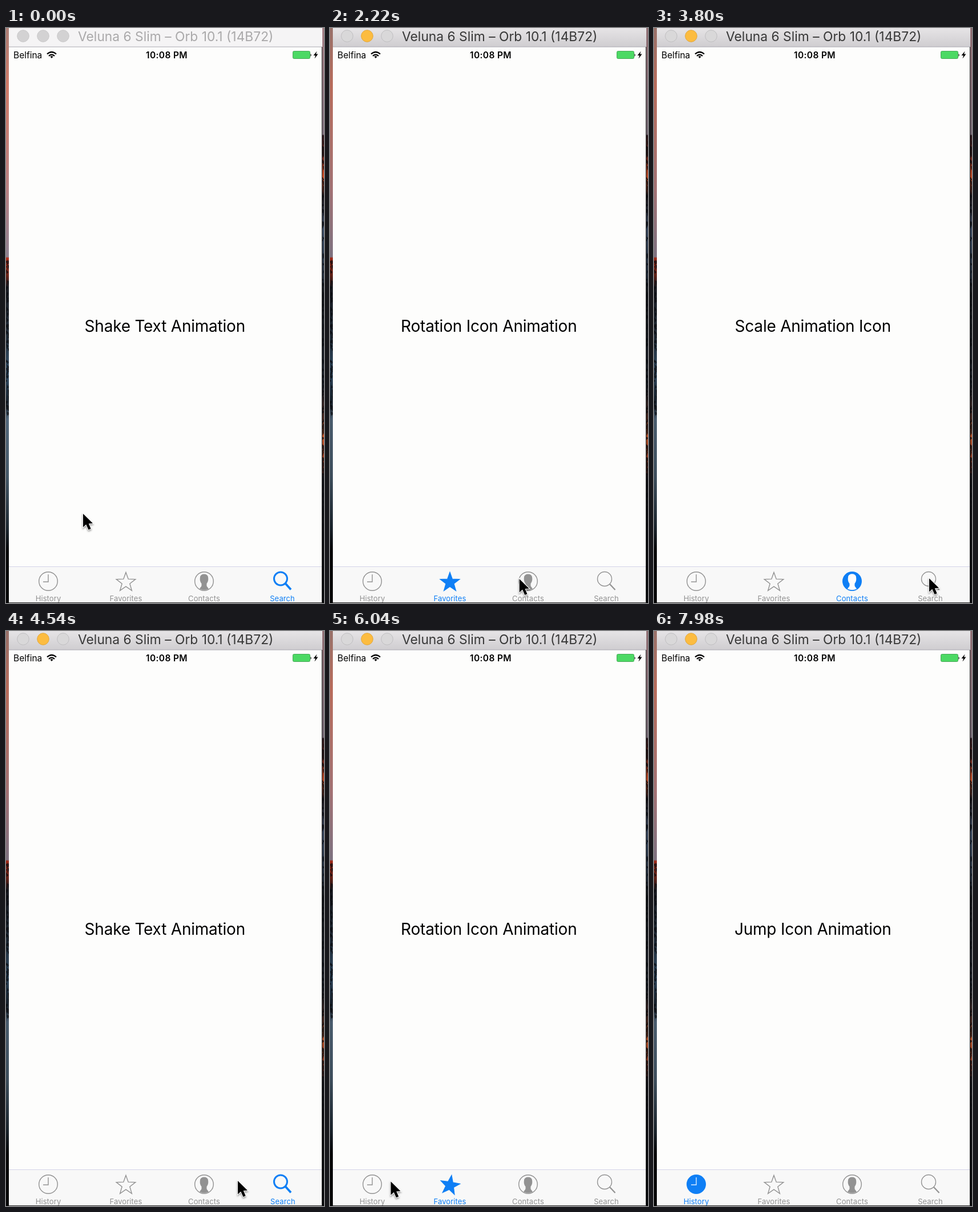
An HTML page for the animation above (8 s loop, 557 by 1005 pixels).

```html
<!DOCTYPE html>
<html lang="en">
<head>
<meta charset="utf-8">
<title>Tab bar animations</title>
<style>
  html, body { margin: 0; width: 100%; height: 100%; overflow: hidden; background: #000; }
  svg { display: block; width: 100vw; height: 100vh; font-family: Inter, Roboto, sans-serif; }
  .tab { color: #929292; }
  .tab text { font-size: 13px; letter-spacing: .1px; text-anchor: middle; fill: currentColor; }
  .line { fill: none; stroke: currentColor; stroke-width: 1.4; }
  .solid { fill: currentColor; }
  .white { fill: #fdfdfd; }
  .on, .selected .off { display: none; }
  .selected { color: #0f7ff5; }
  .selected .on { display: inline; }
</style>
</head>
<body>
<svg viewBox="0 0 557 1005">
  <defs>
    <linearGradient id="leftSky" x2="0" y2="1">
      <stop offset="0" stop-color="#ad8078"/><stop offset=".1" stop-color="#d17b68"/>
      <stop offset=".28" stop-color="#b98284"/><stop offset=".398" stop-color="#8f8292"/>
      <stop offset=".4" stop-color="#b5301c"/><stop offset=".43" stop-color="#6d2519"/>
      <stop offset=".45" stop-color="#191a21"/><stop offset=".54" stop-color="#263442"/>
      <stop offset=".6" stop-color="#34506a"/><stop offset=".65" stop-color="#18222d"/>
      <stop offset=".68" stop-color="#53687c"/><stop offset=".78" stop-color="#455868"/>
      <stop offset=".87" stop-color="#1d2730"/><stop offset=".91" stop-color="#050506"/>
    </linearGradient>
    <linearGradient id="rightSky" x2="0" y2="1">
      <stop offset="0" stop-color="#a67f85"/><stop offset=".185" stop-color="#81747f"/>
      <stop offset=".187" stop-color="#2c1b20"/><stop offset=".23" stop-color="#813021"/>
      <stop offset=".26" stop-color="#d4552b"/><stop offset=".29" stop-color="#1b1519"/>
      <stop offset=".35" stop-color="#40516a"/><stop offset=".43" stop-color="#263140"/>
      <stop offset=".46" stop-color="#15171b"/><stop offset=".62" stop-color="#1d222b"/>
      <stop offset=".68" stop-color="#4b2920"/><stop offset=".7" stop-color="#d26130"/>
      <stop offset=".76" stop-color="#8c3722"/><stop offset=".78" stop-color="#141318"/>
      <stop offset="1" stop-color="#07080a"/>
    </linearGradient>
    <linearGradient id="chrome" x2="0" y2="1">
      <stop offset="0" stop-color="#e6e4e6"/><stop offset="1" stop-color="#cfcdd0"/>
    </linearGradient>
    <clipPath id="screen"><rect x="5" y="33" width="548" height="971"/></clipPath>
    <path id="bust" d="M340 960C340 952.500 354 952.500 354 960C355 966 353 969 351.500 971V975
      C352 977 354 978 355 980.500Q347 984 339 980.500C340 978 342 977 342.500 975V971C341 969 339 966 340 960Z"/>
  </defs>

  <rect width="8" height="1005" fill="url(#leftSky)"/>
  <rect x="549" width="8" height="1005" fill="url(#rightSky)"/>
  <path id="rocks" fill="#0b0c10" opacity=".75"/>
  <rect id="shade" width="557" height="1005" opacity=".12"/>
  <rect x="5" width="549" height="1005" fill="#222"/>
  <rect x="5" y="33" width="548" height="971" fill="#fdfdfc"/>

  <rect id="bar" x="5" width="549" height="33"/>
  <path d="M5 33H553" stroke="#aaa9b2"/>
  <g id="lights" stroke-width="1">
    <circle cx="30" cy="14" r="10.300"/><circle cx="65" cy="14" r="10.300"/><circle cx="100" cy="14" r="10.300"/>
  </g>
  <text id="title" x="126" y="23" font-size="22.800">Veluna 6 Slim – Orb 10.1 (14B72)</text>

  <text x="13" y="53" font-size="15.500">Belfina</text>
  <g fill="none" stroke="#000" stroke-width="2.200">
    <path d="M72 45.500Q80 38.500 88 45.500M75 48.800Q80 44.500 85 48.800"/>
    <path d="M77.500 50Q80 48 82.500 50L80 53Z" fill="#000" stroke="none"/>
  </g>
  <text x="281.500" y="53" font-size="15.500" font-weight="600" letter-spacing=".35" text-anchor="middle">10:08 PM</text>
  <rect x="502.500" y="40.500" width="30" height="13" rx="2" fill="#4cd964" stroke="#47a857"/>
  <path d="M533.500 45Q536 47 533.500 50Z"/>
  <path d="M544.500 40.500L538.500 48H542L540.500 53.500L546.500 45.500H543Z"/>

  <text id="caption" x="278.300" y="531" font-size="28" letter-spacing="-.22" text-anchor="middle"></text>

  <g clip-path="url(#screen)">
    <rect x="5" y="941" width="548" height="63" fill="#f8f8f8"/>
    <path d="M5 941.500H553" stroke="#d3d3e8"/>
    <g class="tab">
      <g class="icon">
        <circle class="line off" cx="74" cy="967" r="16.300"/>
        <circle class="solid on" cx="74" cy="967" r="17"/>
        <path class="line off" d="M74 955V968H65"/>
        <path class="on" d="M74 955V968H65" fill="none" stroke="#d9ecff" stroke-width="1.400"/>
      </g>
      <text x="74" y="1002">History</text>
    </g>
    <g class="tab">
      <g class="icon"><path id="star" class="line"/></g>
      <text x="210" y="1002">Favorites</text>
    </g>
    <g class="tab">
      <g class="icon">
        <circle class="line off" cx="347" cy="967" r="16.300"/>
        <circle class="solid on" cx="347" cy="967" r="17"/>
        <use href="#bust" class="solid off"/><use href="#bust" class="white on"/>
      </g>
      <text x="347" y="1002">Contacts</text>
    </g>
    <g class="tab">
      <g class="icon">
        <g class="line off"><circle cx="481" cy="963" r="12.500"/><path d="M490 972L499.500 982" stroke-width="2.200"/></g>
        <g class="line on" style="stroke-width:3"><circle cx="481" cy="962.500" r="11.500"/><path d="M489.500 971L499 981.500" stroke-width="3.800"/></g>
      </g>
      <text x="484" y="1002">Search</text>
    </g>
  </g>

  <path id="cursor" d="M0 0V23.500L5.300 18.700L9.500 28L13.700 26.300L9.800 17.300L17 16.800Z" stroke="#fff" stroke-width="2"
    paint-order="stroke" style="filter:drop-shadow(0 2px 1.500px #0006)"/>
</svg>
<script>
const LOOP = 8000;
const HISTORY = 0, FAVORITES = 1, CONTACTS = 2, SEARCH = 3;
const captions = ['Jump Icon Animation', 'Rotation Icon Animation', 'Scale Animation Icon', 'Shake Text Animation'];

// [time, tab]
const taps = [[-2000, SEARCH], [600, HISTORY], [1500, FAVORITES], [2500, CONTACTS],
  [3950, SEARCH], [4850, CONTACTS], [5600, FAVORITES], [6350, HISTORY]];

// [time, x, y]
const route = [[0, 135, 849], [480, 72, 964], [700, 72, 964], [1260, 201, 961], [1650, 207, 962],
  [2350, 344, 963], [2650, 346, 963], [3080, 436, 961], [3500, 482, 962], [4100, 482, 962],
  [4540, 406, 961], [4780, 346, 962], [4960, 346, 962], [5380, 225, 954], [5560, 212, 959],
  [5700, 210, 960], [6200, 74, 963], [6420, 74, 965], [6680, 62, 1012], [8000, 62, 1012]];

const $ = id => document.getElementById(id);
const tabs = [...document.querySelectorAll('.tab')];
const icons = tabs.map(tab => tab.querySelector('.icon'));
const labels = tabs.map(tab => tab.querySelector('text'));
const lights = [...$('lights').children];

$('star').setAttribute('d', 'M' + Array.from({ length: 10 }, (_, i) => {
  const r = i % 2 ? 7.2 : 17.6, a = i * Math.PI / 5;
  return [210 + r * Math.sin(a), 969 - r * Math.cos(a)].map(v => v.toFixed(2));
}).join('L') + 'Z');

// Dark flecks that roughen the mountains on both sides of the window
let seed = 7;
const random = () => (seed = seed * 16807 % 2147483647) / 2147483647;
const flecks = (x, top, bottom, count) => Array.from({ length: count }, () => {
  const y = top + random() * (bottom - top);
  return `M${x + random() * 4 - 1} ${y}l${2 + random() * 3} ${2 + random() * 3}l-3 ${2 + random() * 6}z`;
}).join('');
$('rocks').setAttribute('d', flecks(0, 405, 680, 55) + flecks(553, 187, 1000, 150));

const smooth = p => p * p * (3 - 2 * p);
const wave = (dt, period) => Math.sin(2 * Math.PI * dt / period);
const about = (x, y, change) => `translate(${x} ${y}) ${change} translate(${-x} ${-y})`;

const effects = [
  dt => `translate(0 ${-10 * Math.exp(-dt / 180) * Math.abs(wave(dt, 480))})`,
  dt => about(210, 969, `rotate(${360 * smooth(Math.min(dt / 600, 1))})`),
  dt => about(347, 967, `scale(${1 + .35 * Math.exp(-dt / 130) * wave(dt, 320)})`),
  dt => `translate(${7 * Math.exp(-dt / 300) * wave(dt, 139)} 0)`
];

function cursorAt(t) {
  const i = route.findIndex(p => p[0] > t);
  const [t0, x0, y0] = route[i - 1], [t1, x1, y1] = route[i];
  const p = smooth((t - t0) / (t1 - t0));
  return [x0 + (x1 - x0) * p, y0 + (y1 - y0) * p];
}

function draw(t) {
  const active = t >= taps[1][0];
  $('bar').setAttribute('fill', active ? 'url(#chrome)' : '#f5f4f5');
  $('title').setAttribute('fill', active ? '#383838' : '#aaa9aa');
  $('shade').setAttribute('visibility', active ? 'visible' : 'hidden');
  lights.forEach((light, i) => {
    const amber = active && i === 1;
    light.setAttribute('fill', amber ? '#fcbc40' : active ? '#d9d8d9' : '#d3d2d3');
    light.setAttribute('stroke', amber ? '#e2a73c' : active ? '#c0bfc1' : '#c9c8c9');
  });

  const [start, current] = taps.filter(tap => tap[0] <= t).pop();
  $('caption').textContent = captions[current];
  tabs.forEach((tab, i) => {
    const selected = i === current;
    tab.classList.toggle('selected', selected);
    const part = i === SEARCH ? labels[i] : icons[i];
    part.setAttribute('transform', selected ? effects[i](t - start) : '');
  });
  $('star').style.fill = current === FAVORITES ? 'currentColor' : 'none';
  $('cursor').setAttribute('transform', `translate(${cursorAt(t)})`);
}

const begin = performance.now();
function tick() {
  draw((performance.now() - begin) % LOOP);
  requestAnimationFrame(tick);
}
tick();
</script>
</body>
</html>
```
